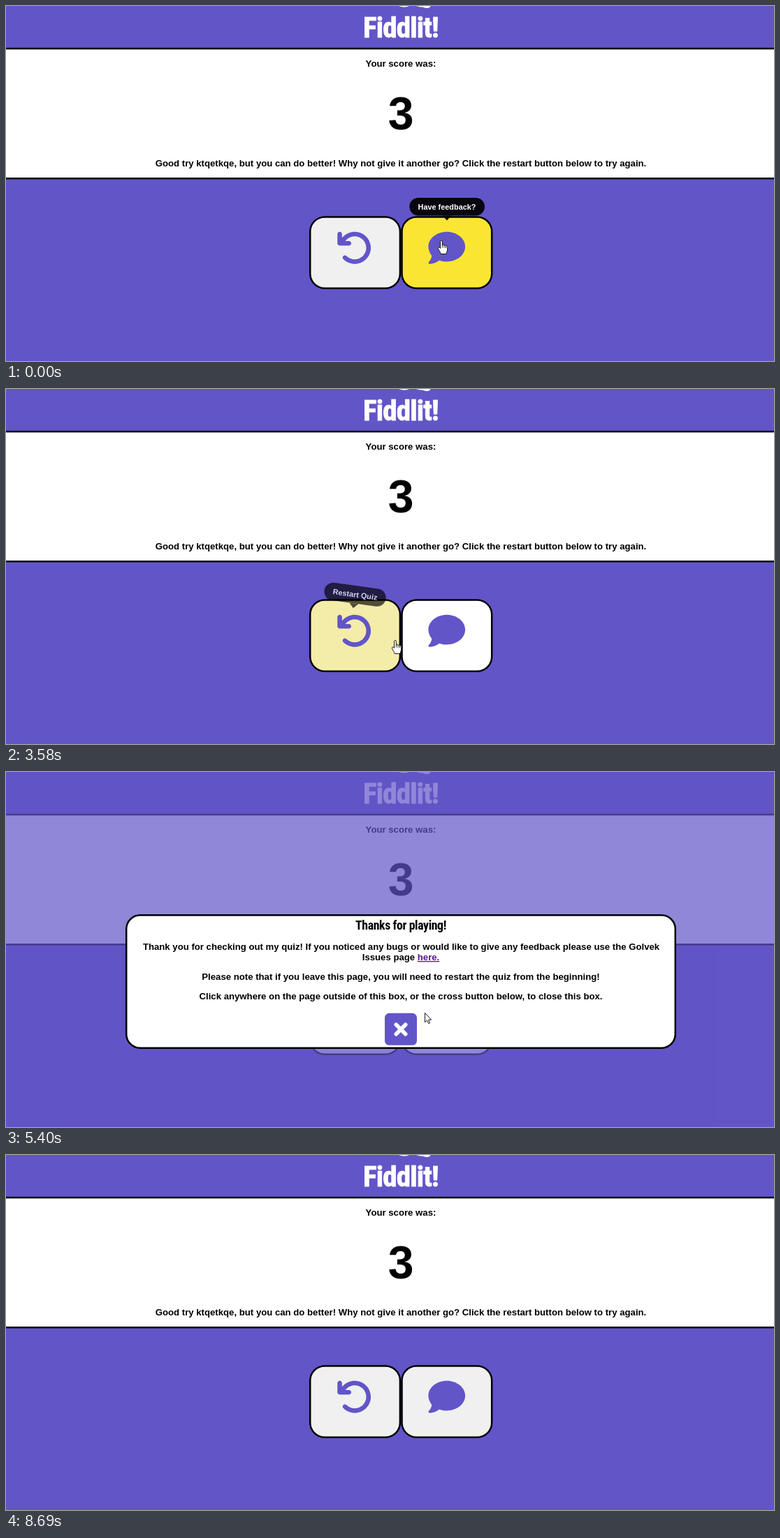
Write an HTML page that moves like this. It is 1099 px wide and 509 px high and loops after 9.06 s.

```html
<!DOCTYPE html>
<html lang="en">
<head>
<meta charset="utf-8">
<title>Quiz score</title>
<style>
  html, body { margin: 0; width: 100%; height: 100%; overflow: hidden; background: #6255c8; }
  svg { display: block; width: 100vw; height: 100vh; }
  text { font: bold 13.18px "Liberation Sans", Arial, sans-serif; text-anchor: middle; }
  .fancy {
    font-family: "Roboto Condensed", "Open Sans Condensed", "Noto Sans Condensed", "Open Sans", "Noto Sans", sans-serif;
    font-weight: 800; font-stretch: 75%; letter-spacing: -.02em;
  }
  .score { font-size: 66px; }
  .tip text { font-size: 10.9px; fill: #fff; }
  .tip path, .tip rect { fill: #000; }
  .box { stroke: #000; stroke-width: 2.5; }
  .icon { fill: #6255c8; }
  .link { fill: #551a8b; text-decoration: underline; }
  .cursor path { fill: #fff; stroke: #000; stroke-width: .9; stroke-linejoin: round; }
  .cursor .lines { fill: none; }
</style>
</head>
<body>
<svg viewBox="0 0 1099 509" preserveAspectRatio="none">
  <rect width="1099" height="509" fill="#6255c8"/>

  <g fill="#fff">
    <path d="M562 0h15q-4 1.8-8 1.6T562 0zM587 0h20.500q-1 3.200-5 3-4-.2-7-1.800-3 .8-8.500-1.200z"/>
    <text class="fancy" data-fit="108" data-max="42" x="565" y="45" stroke="#fff" stroke-width=".8">Fiddlit!</text>
  </g>

  <rect y="59.800" width="1099" height="188.700"/>
  <rect y="62.300" width="1099" height="183.700" fill="#fff"/>
  <text x="565" y="87">Your score was:</text>
  <text class="score" x="565" y="177">3</text>
  <text x="565" y="230">Good try ktqetkqe, but you can do better! Why not give it another go? Click the restart button below to try again.</text>

  <rect id="restart" class="box" x="435.200" y="302.500" width="128.700" height="102.300" rx="21"/>
  <rect id="feedback" class="box" x="566.500" y="302.500" width="128.700" height="102.300" rx="21"/>
  <path class="icon" transform="translate(472.600 320.400) scale(.103)" d="M125.7 160H176c17.700 0 32 14.300 32 32s-14.300 32-32 32H48c-17.700 0-32-14.300-32-32V64c0-17.700 14.300-32 32-32s32 14.300 32 32v51.200L97.600 97.600c87.500-87.500 229.300-87.500 316.800 0s87.500 229.300 0 316.800s-229.300 87.500-316.800 0c-12.500-12.500-12.500-32.800 0-45.300s32.800-12.500 45.300 0c62.500 62.500 163.800 62.500 226.300 0s62.500-163.800 0-226.300s-163.800-62.500-226.300 0z"/>
  <path class="icon" transform="translate(604.400 320.400) scale(.103)" d="M512 240c0 114.900-114.600 208-256 208c-37 0-72-6-104-18c-12 9-31 21-54 31C74 471 45 480 16 480c-13 0-21-16-11-27c10-10 38-44 42-86C18 327 0 285 0 240C0 125.100 114.600 32 256 32s256 93.100 256 208z"/>

  <g id="restartTip" class="tip">
    <g fill-opacity=".93">
      <path fill-opacity=".93" d="M493 300.500h13l-6.500 7z"/>
      <rect fill-opacity=".93" x="455" y="275" width="89" height="25.500" rx="12.700"/>
    </g>
    <text x="499.500" y="291.500">Restart Quiz</text>
  </g>
  <g id="feedbackTip" class="tip">
    <path fill-opacity=".93" d="M624.500 300.500h13l-6.500 7z"/>
    <rect fill-opacity=".93" x="577.300" y="275" width="107.700" height="25.500" rx="12.700"/>
    <text x="631" y="291.500">Have feedback?</text>
  </g>

  <g id="modal">
    <rect width="1099" height="509" fill="#6255c8" fill-opacity=".7"/>
    <rect class="box" x="172.200" y="205.300" width="785.600" height="190.500" rx="20" fill="#fff"/>
    <text class="fancy" data-fit="130" data-max="21" x="565" y="226">Thanks for playing!</text>
    <text x="565.500" y="255">Thank you for checking out my quiz! If you noticed any bugs or would like to give any feedback please use the Golvek</text>
    <text x="565" y="270">Issues page <tspan class="link">here.</tspan></text>
    <text x="565" y="298">Please note that if you leave this page, you will need to restart the quiz from the beginning!</text>
    <text x="565" y="326">Click anywhere on the page outside of this box, or the cross button below, to close this box.</text>
    <rect x="542" y="345.800" width="46" height="46" rx="6.500" fill="#6255c8"/>
    <path d="M558.300 362.300l13.400 13.400m0-13.400l-13.400 13.400" stroke="#fff" stroke-width="5.600" stroke-linecap="round"/>
  </g>

  <g id="arrow" class="cursor">
    <path d="M.5.5V13.800L3.500 11 5.700 15.700 7.700 14.800 5.600 10.200H9.700z"/>
  </g>
  <g id="hand" class="cursor">
    <path d="M-1.500 11.500V1.700C-1.500-.1 1.300-.1 1.300 1.700V7C1.500 5.800 3.800 5.900 4 7.500 4.400 6.500 6.300 6.700 6.500 8.300 7 7.400 8.700 7.800 8.700 9.500V13C8.700 15.500 7.200 16.500 7.200 19.500H-.8C-.8 17.500-4.700 13-4.700 11.300-4.700 9.600-2.600 9.600-1.500 11.500z"/>
    <path class="lines" d="M1.300 7v3.500M4 7.500v3.200M6.500 8.300v2.700"/>
  </g>
</svg>
<script>
const LOOP = 9060;
const $ = id => document.getElementById(id);

// time, tip x, tip y, shape
const moves = [
  [0, 623, 336, "hand"], [400, 623, 336, "arrow"],
  [1490, 617, 339, "arrow"], [1610, 606, 344, "arrow"], [1730, 594, 349, "arrow"],
  [1850, 582, 352, "hand"], [1970, 574, 354, "hand"],
  [2120, 563, 358, "hand"], [2240, 557, 360, "hand"],
  [3970, 566, 360, "hand"], [4090, 572, 358, "hand"], [4220, 578, 355, "hand"],
  [4340, 583, 352, "hand"], [4460, 587, 349, "hand"],
  [4600, 591, 348, "hand"], [4720, 596, 346, "hand"], [4840, 599, 345, "hand"],
  [5400, 599, 345, "arrow"], [5830, 607, 331, "arrow"], [5960, 621, 303, "arrow"],
  [6110, 648, 246, "arrow"], [6230, 675, 193, "arrow"], [6350, 688, 168, "arrow"],
  [6500, 688, 165, "arrow"],
  [8060, 745, 215, "arrow"], [8180, 860, 310, "arrow"], [8300, 985, 405, "arrow"],
  [8420, 1073, 468, "arrow"], [8540, 1068, 482, "arrow"], [8690, 0, 0, ""]
];

// time, modal open, restart hover, feedback hover, feedback resting colour
const states = [
  [0, 0, 0, 1, 240], [400, 1, 0, 0, 255],
  [3580, 0, .72, 0, 255], [3720, 0, 1, 0, 255],
  [3970, 0, .85, .45, 255], [4090, 0, .55, .75, 255], [4220, 0, .25, .92, 255],
  [4340, 0, .06, .98, 255], [4460, 0, 0, 1, 255],
  [5400, 1, 0, 0, 255], [7780, 0, 0, 0, 240]
];

const at = (table, t) => table.findLast(row => row[0] <= t);
const show = (id, on) => $(id).style.display = on ? "" : "none";

function hover(id, amount, rest, cx) {
  const k = amount ** 3;
  const mix = [250, 230, 50].map(c => Math.round(rest + (c - rest) * k));
  $(id).style.fill = `rgb(${mix})`;
  const tip = $(id + "Tip"), left = 1 - amount;
  tip.style.opacity = amount;
  tip.setAttribute("transform", `translate(0 ${left * 25}) rotate(${left * 28} ${cx} 288)`);
}

function draw(t) {
  const [, open, restart, feedback, rest] = at(states, t);
  show("modal", open);
  hover("restart", restart, 240, 499.5);
  hover("feedback", feedback, rest, 631);

  const [, x, y, shape] = at(moves, t);
  for (const id of ["arrow", "hand"]) {
    show(id, id === shape);
    $(id).setAttribute("transform", `translate(${x} ${y})`);
  }
}

// Choose the largest heading size that fits its column.
for (const el of document.querySelectorAll("[data-fit]")) {
  const { fit, max } = el.dataset;
  el.style.fontSize = max + "px";
  const size = Math.min(max, max * fit / el.getComputedTextLength());
  el.style.fontSize = size + "px";
}

function tick() {
  draw(performance.now() % LOOP);
  requestAnimationFrame(tick);
}
tick();
</script>
</body>
</html>
```
